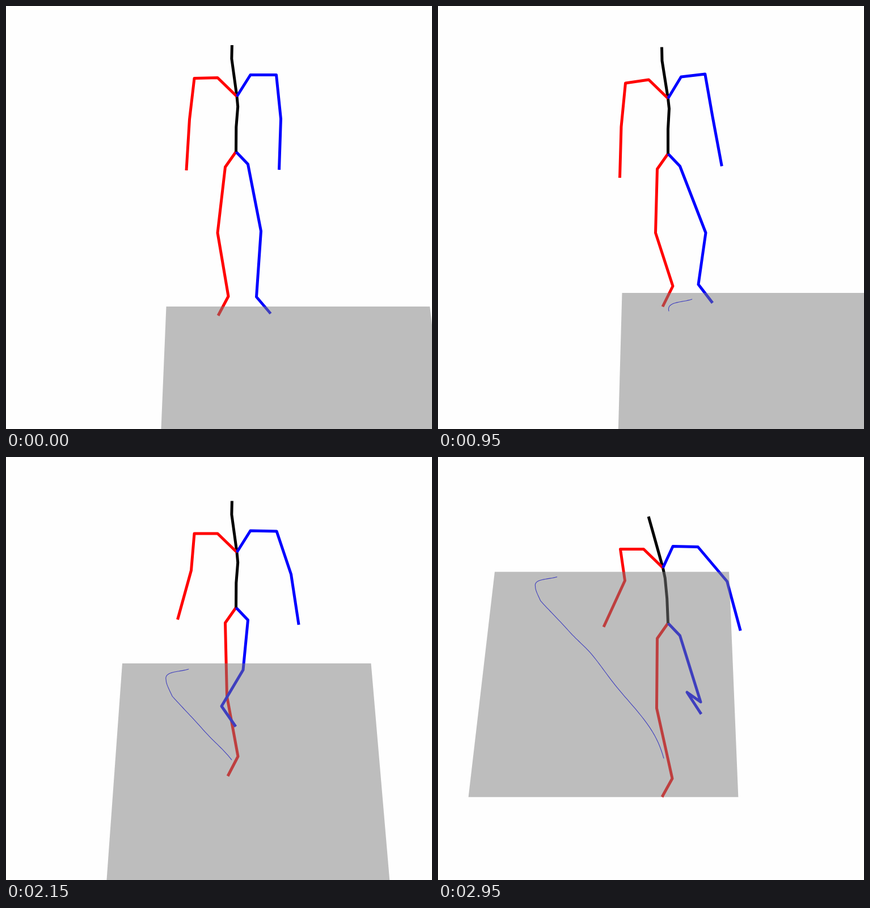
An HTML page with a canvas for the animation above (3000 ms loop, 751x746 px).

```html
<!DOCTYPE html>
<html lang="en">
<head>
<meta charset="utf-8">
<title>Walking figure</title>
<style>
html, body { margin: 0; width: 100%; height: 100%; overflow: hidden; background: #fefefe; }
canvas { display: block; }
</style>
</head>
<body>
<canvas id="stage" width="751" height="746"></canvas>
<script>
const ctx = document.getElementById('stage').getContext('2d');
const LOOP = 3000, STEP = 50;
const RED = '#f00', BLUE = '#00f';

// Key values at: standing, leaning, then four strides on alternate feet.
const hipY = [257, 260.5, 260, 265.5, 268.5, 293];
const lean = [1.5, 0, 4, 1.5, -1, -9];
const tilt = [-3, 2, 1, -4, 8, -4];
const floorX = [282.5, 324.5, 254, 205, 151, 100];
const floorY = [530, 506, 418, 364, 291.5, 202.5];

// Bones are offsets from the joint above; a forearm needs only its x.
const right = {
  side: -1, color: RED, hip: [-19, 27], foot: [-18, 48],
  upperX: [-8.5, -7.5, -11.5, -5.5, -29.5, 8],
  upperY: [72.5, 77, 73.5, 65, 72.5, 55.5],
  reach: [-5.5, -2.5, -9.5, -24, 4.5, -37.5],
  thighX: [-13.5, -3, -21, 3, -30, -1],
  thighY: [116, 112.5, 123.5, 129.5, 86.5, 123],
  shinX: [19, 30.5, 19.5, 19.5, -0.5, 27.5],
  shinY: [112, 94, 70.5, 106, 46.5, 124]
};
const left = {
  side: 1, color: BLUE, hip: [21, 22], foot: [25, 44],
  upperX: [8, 13, 8.5, 25.5, 6.5, 51.5],
  upperY: [77.5, 74, 65.5, 76, 47.5, 61],
  reach: [-3, 16.5, 19, 13.5, 48, 23.5],
  thighX: [23, 45.5, 11.5, -8.5, 43, 36.5],
  thighY: [118, 117.5, 123, 88, 120.5, 117],
  shinX: [-8, -13, -20, -38, 9.5, -24],
  shinY: [116, 91, 113, 64, 122, -17]
};

// Stride count: a slow start, a hesitant first pace, then an even beat.
function strides(t) {
  if (t < 950) return (t / 950) ** 2;
  if (t >= 1750) return 2 + (t - 1750) / 400;
  const p = (t - 950) / 800;
  return 1 + p + p * (1 - p) * (0.7 - 1.7 * p);
}

// Smooth curve through evenly spaced key values.
function curve(keys, n) {
  const last = keys.length - 1;
  const i = Math.min(Math.floor(n), last - 1), p = n - i;
  const slope = k => {
    const a = Math.max(k - 1, 0), b = Math.min(k + 1, last);
    return (keys[b] - keys[a]) / (b - a);
  };
  const ease = p * p * (3 - 2 * p), q = 1 - p;
  return keys[i] + (keys[i + 1] - keys[i]) * ease +
    p * q * (q * slope(i) - p * slope(i + 1));
}

// The legs fit one short extra step in between the first two strides.
function legCurve(keys, n) {
  const v = curve(keys, n);
  const step = n > 1 && n < 2 ? 0.7 * Math.sin(Math.PI * n) ** 2 : 0;
  return v + (keys[3] - v) * step;
}

const add = ([x, y], dx, dy) => [x + dx, y + dy];

function rootAt(n) {
  const bob = n > 2 ? 2.5 * Math.abs(Math.sin(Math.PI * n)) : 0;
  return [405.5, curve(hipY, n) - bob];
}

function spine(root, bend) {
  return [
    add(root, -11 + 2.6 * bend, -188),
    add(root, -10.5 + 1.9 * bend, -164),
    add(root, bend, -97.5),
    add(root, 2 + 0.8 * bend, -79.5),
    add(root, 0.2 * bend, -43.5),
    root
  ];
}

function arm(body, chest, n) {
  const bend = curve(lean, n), roll = curve(tilt, n);
  const isLeft = body.side > 0;
  const collar = isLeft ? add(chest, 23 + 0.6 * bend, -38) : add(chest, -34, -33);
  const shoulder = isLeft
    ? add(chest, 66.5 + 0.8 * bend - 0.6 * roll, -41 - roll)
    : add(chest, -75, -29 + roll);
  const elbow = add(shoulder, curve(body.upperX, n), curve(body.upperY, n));
  const reach = curve(body.reach, n);
  const hand = add(elbow, reach, Math.sqrt(90 * 90 - reach * reach));
  return [chest, collar, shoulder, elbow, hand];
}

// A foot points further down as its heel rises.
function leg(body, root, n) {
  const hip = add(root, ...body.hip);
  const knee = add(hip, legCurve(body.thighX, n), legCurve(body.thighY, n));
  const shinY = legCurve(body.shinY, n);
  const ankle = add(knee, legCurve(body.shinX, n), shinY);
  const toe = add(ankle, body.foot[0], body.foot[1] - Math.max(shinY, 45) / 8);
  return [root, hip, knee, ankle, toe];
}

// Floor in perspective: its sides meet at (VX, VY), and 1 / v is the scale.
const VX = 405.5, VY = -2415, FLOOR_W = 0.1578, FLOOR_D = 5.033e-5;
const toFloor = (x, y) => [(x - VX) / (y - VY), 1 / (y - VY)];
const toScreen = ([u, v]) => [VX + u / v, VY + 1 / v];

function floorCorner(t) {
  const n = strides(t);
  const sway = n > 2 ? 1.2 * (n - 2) ** 2 * Math.sin(Math.PI * n) : 0;
  return toFloor(curve(floorX, n) - sway, curve(floorY, n));
}

// Point under the body, measured from the floor's corner.
function footing(t) {
  const drift = Math.min(Math.max((t - 950) / 300, 0), 1);
  const [u, v] = toFloor(407 - 9 * drift, 541.5 - t / 300);
  const [u0, v0] = floorCorner(t);
  return [u - u0, v - v0];
}

function trace(points) {
  ctx.beginPath();
  points.forEach(([x, y]) => ctx.lineTo(x, y));
}

function line(points, color, width = 5) {
  trace(points);
  ctx.strokeStyle = color;
  ctx.lineWidth = width;
  ctx.stroke();
}

function draw(t) {
  const n = strides(t);
  ctx.fillStyle = '#fefefe';
  ctx.fillRect(0, 0, 751, 746);
  ctx.lineJoin = 'round';

  const [u0, v0] = floorCorner(t);
  const place = ([u, v]) => toScreen([u + u0, v + v0]);
  const trail = [];
  for (let s = 0; s <= t; s += STEP / 2) trail.push(place(footing(s)));
  line(trail, BLUE, 1.1);

  const root = rootAt(n);
  const back = spine(root, curve(lean, n));
  for (const body of [right, left]) line(leg(body, root, n), body.color);
  line(back, '#000');
  for (const body of [right, left]) line(arm(body, back[2], n), body.color);

  trace([[0, 0], [FLOOR_W, 0], [FLOOR_W, -FLOOR_D], [0, -FLOOR_D]].map(place));
  ctx.fillStyle = 'rgba(127, 127, 127, 0.5)';
  ctx.fill();
}

const start = performance.now();
function tick() {
  const t = (performance.now() - start) % LOOP;
  draw(Math.floor(t / STEP) * STEP);
  requestAnimationFrame(tick);
}
tick();
</script>
</body>
</html>
```
